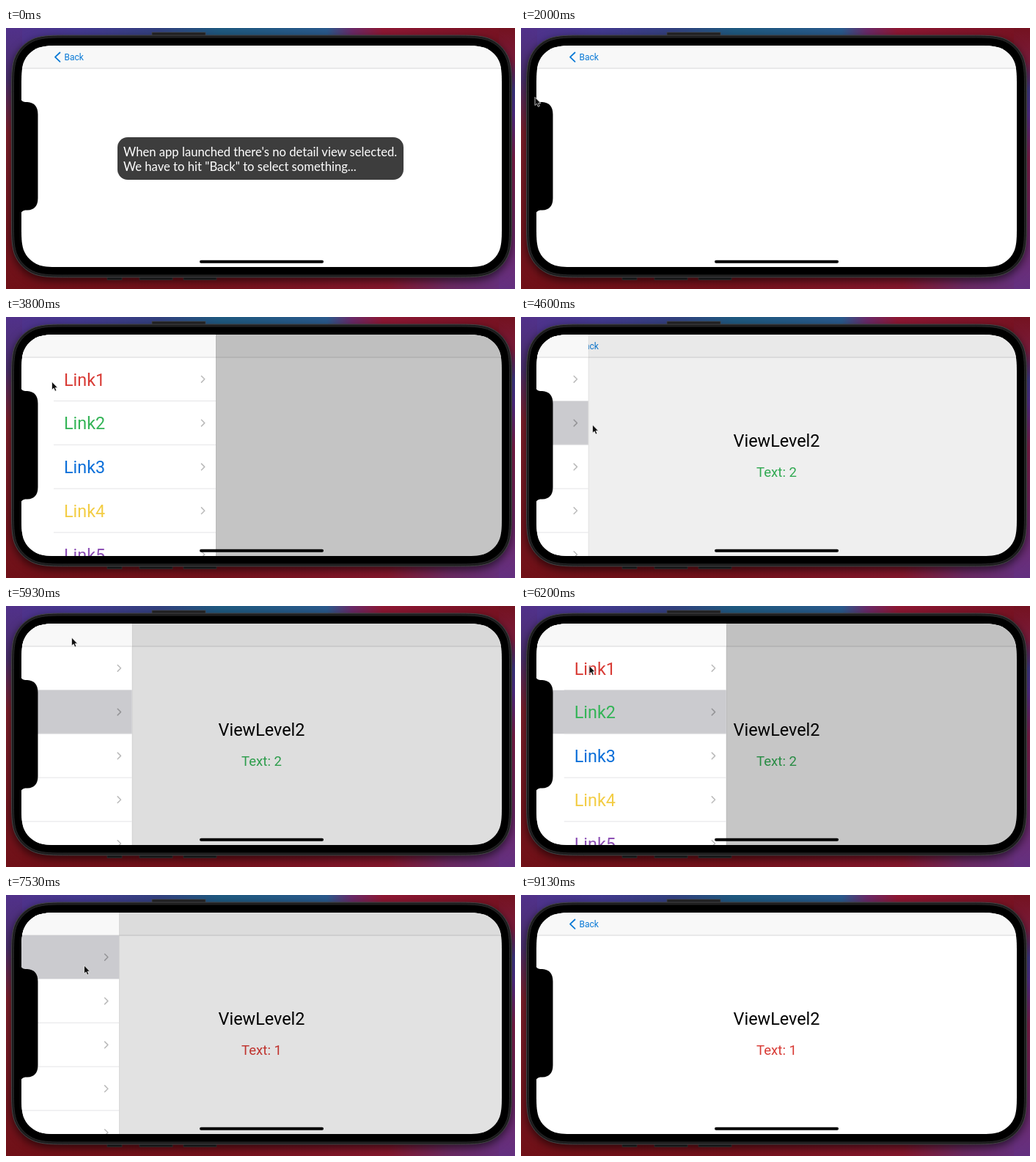
An HTML page that plays this animation: 694x356 px, repeating every 9400 ms.

```html
<!DOCTYPE html>
<html lang="en">
<head>
<meta charset="utf-8">
<title>Sidebar navigation</title>
<style>
  html, body { margin: 0; width: 100%; height: 100%; overflow: hidden; background: #000; }
  svg { display: block; width: 694px; height: 356px; font-family: Roboto, sans-serif; }
  .title { font-size: 23.4px; }
  .value { font-size: 18.6px; }
  .back { font-size: 12px; }
  .caption { font: 16.65px Lato, sans-serif; fill: #fff; }
  .line { fill: none; stroke-linecap: round; stroke-linejoin: round; }
  #body { filter: drop-shadow(0 4px 6px rgba(0, 0, 0, .6)); }
</style>
</head>
<body>
<svg viewBox="0 0 694 356">
  <defs>
    <linearGradient id="top">
      <stop offset="0" stop-color="#51318a"/><stop offset=".15" stop-color="#443a90"/>
      <stop offset=".3" stop-color="#33417f"/><stop offset=".42" stop-color="#1f5a80"/>
      <stop offset=".63" stop-color="#2a5a8c"/><stop offset=".68" stop-color="#6a2a68"/>
      <stop offset=".74" stop-color="#8e1834"/><stop offset="1" stop-color="#741220"/>
    </linearGradient>
    <linearGradient id="bottom">
      <stop offset="0" stop-color="#6f1017"/><stop offset=".4" stop-color="#74121b"/>
      <stop offset=".75" stop-color="#84172c"/><stop offset=".87" stop-color="#6b2a62"/>
      <stop offset="1" stop-color="#633080"/>
    </linearGradient>
    <linearGradient id="left" x2="0" y2="1">
      <stop offset="0" stop-color="#51318a"/><stop offset=".2" stop-color="#4a2f6c"/>
      <stop offset=".4" stop-color="#80202c"/><stop offset="1" stop-color="#6f1017"/>
    </linearGradient>
    <linearGradient id="right" x2="0" y2="1">
      <stop offset="0" stop-color="#741220"/><stop offset=".13" stop-color="#7a1c3c"/>
      <stop offset=".24" stop-color="#453d92"/><stop offset=".33" stop-color="#5b3297"/>
      <stop offset=".5" stop-color="#8a2150"/><stop offset="1" stop-color="#633080"/>
    </linearGradient>
    <clipPath id="screen"><path id="glass"/></clipPath>
  </defs>

  <!-- wallpaper -->
  <rect width="694" height="180" fill="url(#top)"/>
  <rect y="180" width="694" height="176" fill="url(#bottom)"/>
  <rect width="22" height="356" fill="url(#left)"/>
  <rect x="672" width="22" height="356" fill="url(#right)"/>

  <!-- phone body -->
  <g fill="#242426" stroke="#4a4a4c" stroke-width=".7">
    <rect x="199" y="6" width="73" height="6"/>
    <rect x="138" y="338" width="20" height="5.5"/>
    <rect x="182" y="338" width="45" height="5.5"/>
    <rect x="242" y="338" width="45" height="5.5"/>
  </g>
  <path id="body" stroke="#454547" fill="#1b1b1c"/>
  <path id="bezel" stroke="#303032" stroke-width=".8"/>

  <g clip-path="url(#screen)">
    <rect x="21" y="24" width="655" height="302" fill="#fff"/>
    <rect x="21" y="24" width="655" height="31" fill="#f8f8f8"/>
    <path d="M21 55H676" stroke="#d6d6d7"/>
    <path class="line" d="M73.500 33.500 67 39.700l6.500 6.200" stroke="#0879d6" stroke-width="1.8"/>
    <text class="back" x="79.500" y="44" fill="#0879d6">Back</text>
    <g id="detail" text-anchor="middle">
      <text class="title" x="348.500" y="177">ViewLevel2</text>
      <text class="value" id="value" x="348.500" y="218"></text>
    </g>
    <rect id="dim" x="21" y="24" width="655" height="302"/>
    <g id="sidebar">
      <rect x="-10" y="24" width="296" height="302" fill="#fff"/>
      <rect x="-10" y="24" width="296" height="31" fill="#f8f8f8"/>
      <path d="M-10 55H286" stroke="#d6d6d7"/>
      <rect id="selected" x="-10" width="296" height="59.5" fill="#cbcbcf"/>
      <g id="rows"></g>
      <path d="M286.500 24V326" stroke="#000" stroke-opacity=".06"/>
    </g>
    <path d="M20 96Q21 101 26 101H29Q43.500 102 43.500 118V232Q43.500 248 29 248.500H26Q21 249 20 254Z"/>
    <rect x="264" y="316.700" width="169" height="4" rx="2"/>
  </g>

  <g id="caption">
    <rect x="152" y="149" width="390" height="58" rx="14" fill="#3d3d3d"/>
    <text class="caption" x="160" y="175">When app launched there's no detail view selected.</text>
    <text class="caption" x="160" y="195">We have to hit "Back" to select something...</text>
  </g>
  <path id="cursor" d="M.5 0V11.200L3.100 8.900 4.900 13 6.900 12.100 5.200 8.200H8.500Z" fill="#111" stroke="#fff" stroke-width=".7"/>
</svg>
<script>
const LOOP = 9400, STEP = 1000 / 15, ROW = 59.8;
const COLORS = ['#d83a34', '#34b457', '#0b6fd9', '#f3cd45', '#8d50b5'];
const $ = id => document.getElementById(id);

// Sidebar moves: start time and whether it opens
const SLIDES = [[2911, true], [4414, false], [5797, true], [7414, false]];

// Pointer path: time, x, y
const POINTER = [
  [1860, 2, 103], [2200, 42, 82], [2530, 90, 50], [2733, 84, 40], [3130, 84, 40],
  [3790, 61, 87], [4000, 82, 112], [4200, 113, 143], [4333, 97, 147], [4660, 97, 147],
  [5390, 97, 54], [5730, 89, 43], [6000, 89, 43], [6790, 103, 195], [7330, 106, 96],
  [7600, 106, 96], [8400, 115, 85], [8930, 115, 85], [9000, 180, 66], [9067, 310, 41], [9130, 310, 41]
];

// Rectangle whose corners ease gradually into the straight sides
function smoothRect(x, y, w, h, r) {
  const corner = [
    [0, 1.528], [0, 1.088], [0, 0.868], [0.075, 0.631], [0.169, 0.373],
    [0.373, 0.169], [0.631, 0.075], [0.868, 0], [1.088, 0], [1.528, 0]
  ];
  const place = (right, low) => ([a, b]) =>
    [right ? x + w - a * r : x + a * r, low ? y + h - b * r : y + b * r];
  const curve = (right, low) => {
    const points = corner.map(place(right, low));
    if (right !== low) points.reverse();
    return points[0] + 'C' + points.slice(1).join(' ');
  };
  return `M${curve(false, false)}L${curve(true, false)}L${curve(true, true)}L${curve(false, true)}Z`;
}

$('glass').setAttribute('d', smoothRect(21, 24, 655, 302, 37.7));
$('bezel').setAttribute('d', smoothRect(10.5, 13, 676, 324, 48));
$('body').setAttribute('d', smoothRect(7.5, 10, 682, 330, 51));

$('rows').innerHTML = COLORS.map((color, i) => {
  const y = 55 + i * ROW;
  return `<text class="title" x="79" y="${y + 38.5}" fill="${color}">Link${i + 1}</text>
    <path class="line" d="M266.500 ${y + 25.5}l4.300 4.300-4.300 4.300" stroke="#000" stroke-opacity=".27" stroke-width="1.5"/>
    <path d="M65 ${y + ROW - .3}H286" stroke="#e4e4e6"/>`;
}).join('');

// Critically damped spring from 0 to 1
function spring(ms) {
  const x = ms * 0.014;
  return 1 - (1 + x) * Math.exp(-x);
}

function openAmount(t) {
  const slide = SLIDES.findLast(([start]) => t >= start);
  if (!slide) return 0;
  const p = spring(t - slide[0]);
  return slide[1] ? p : 1 - p;
}

function pointerAt(t) {
  const i = POINTER.findIndex(([time]) => time > t);
  if (i < 1) return null;
  const [t0, x0, y0] = POINTER[i - 1], [t1, x1, y1] = POINTER[i];
  const k = (t - t0) / (t1 - t0);
  return [x0 + (x1 - x0) * k, y0 + (y1 - y0) * k];
}

function show(id, visible) {
  $(id).style.display = visible ? '' : 'none';
}

function draw(now) {
  const t = Math.floor((now % LOOP + 4) / STEP) * STEP;
  const open = openAmount(t);
  const choice = t < 4460 ? 0 : t < 7460 ? 2 : 1;

  show('caption', t < 860);
  show('detail', choice);
  show('selected', choice);
  if (choice) {
    $('value').textContent = 'Text: ' + choice;
    $('value').setAttribute('fill', COLORS[choice - 1]);
    $('selected').setAttribute('y', 55 + (choice - 1) * ROW);
  }

  show('sidebar', open > 0.004);
  $('sidebar').setAttribute('transform', `translate(${265 * (open - 1)})`);
  $('dim').setAttribute('opacity', 0.23 * open);

  const pointer = pointerAt(t);
  show('cursor', pointer);
  if (pointer) $('cursor').setAttribute('transform', `translate(${pointer})`);
}

function tick() {
  draw(performance.now());
  requestAnimationFrame(tick);
}
tick();
</script>
</body>
</html>
```
